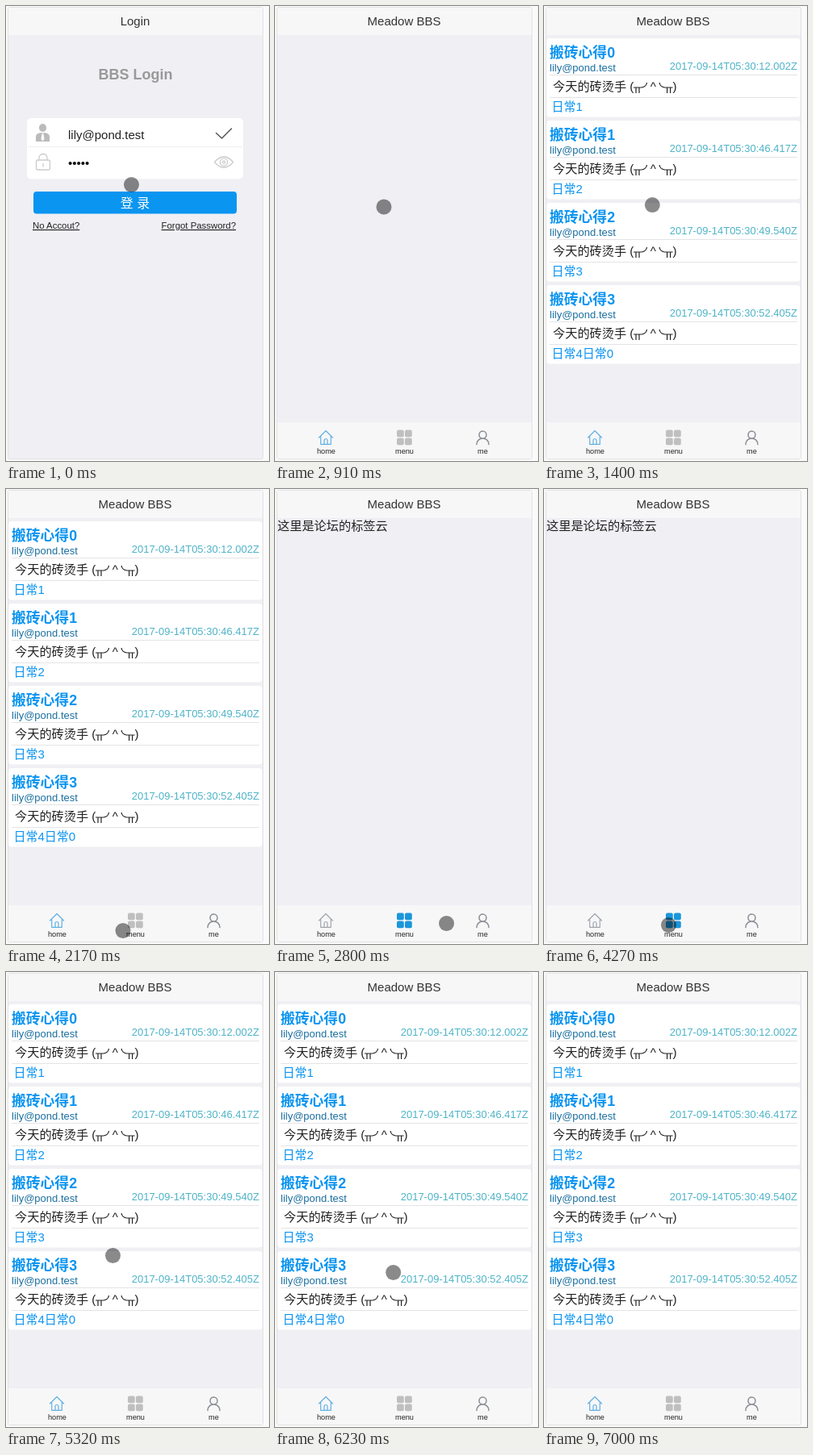
Write an HTML page that moves like this. It is 326 px wide and 564 px high and loops after 7490 ms.

```html
<!DOCTYPE html>
<html lang="zh">
<head>
<meta charset="utf-8">
<title>Forum app</title>
<style>
  html, body { margin: 0; width: 100%; height: 100%; overflow: hidden; background: #fafafa; }
  svg { display: block; width: 100vw; height: 100vh; }
  text { font-family: "Liberation Sans", Arial, "Noto Sans CJK SC", "Noto Sans CJK", sans-serif; white-space: pre; }
  .line { fill: none; stroke-linecap: round; stroke-linejoin: round; }
</style>
</head>
<body>
<svg id="stage" viewBox="0 0 326 564">
  <rect width="326" height="564" fill="#fafafa"/>
  <rect x="2.5" y="1.5" width="316" height="560" rx="2" fill="#efeff4" stroke="#e2e2e4"/>
  <rect x="3" y="2" width="315" height="34" fill="#f7f7f8"/>
  <text id="title" x="160" y="24" font-size="15" fill="#333" text-anchor="middle"></text>

  <g id="login">
    <text x="160.5" y="91" font-size="18" font-weight="bold" fill="#999" text-anchor="middle">BBS Login</text>
    <rect x="26" y="139" width="268" height="75.5" rx="5" fill="#fff"/>
    <path d="M27 174.5H293" stroke="#eee"/>
    <g fill="#bbb">
      <ellipse cx="45.5" cy="151" rx="4.6" ry="5"/>
      <path d="M37 168V162Q37 158.5 41 157.5L44 157L45.5 158L47 157L50 157.5Q54 158.5 54 162V168Z"/>
      <path d="M44.5 158.5H46.5L47.5 165L45.5 167.5L43.5 165Z" fill="#fff"/>
    </g>
    <g class="line" stroke="#ccc" stroke-width="1.3">
      <rect x="37.5" y="191" width="17" height="12" rx="2"/>
      <path d="M41 191V188A5 4.5 0 0 1 51 188V191M46 195.5V199"/>
      <path d="M258.5 193.5Q270 180 281.5 193.5Q270 207 258.5 193.5Z"/>
      <circle cx="270" cy="193.5" r="4.6"/>
      <circle cx="270" cy="193.5" r="1.6"/>
    </g>
    <path class="line" d="M260.5 157.5L267.5 164L279.5 152" stroke="#555" stroke-width="1.5"/>
    <text x="77" y="165" font-size="15" fill="#222">lily@pond.test</text>
    <text x="77" y="200" font-size="15" fill="#111">•••••</text>
    <rect x="34" y="230" width="252" height="27.5" rx="4" fill="#0a95f0"/>
    <text x="160" y="250" font-size="16" font-weight="500" fill="#fff" text-anchor="middle">登 录</text>
    <rect id="press" x="34" y="230" width="252" height="27.5" rx="4" opacity=".4"/>
    <g font-size="11.4" fill="#222" text-decoration="underline">
      <text x="33" y="276">No Accout?</text>
      <text x="285" y="276" text-anchor="end">Forgot Password?</text>
    </g>
  </g>

  <g id="cards"></g>
  <text id="note" x="3" y="51" font-size="15.2" fill="#222"></text>

  <g id="tabs">
    <rect x="3" y="516" width="315" height="45" fill="#f7f7f8"/>
    <path id="home" class="line" stroke-width="1.2" d="M54.5 535L63 526.5L71.5 535M56.7 533.5V543.3H69.3V533.5M61 543V538.5Q61 536.5 63 536.5T65 538.5V543"/>
    <g id="menu"></g>
    <path id="me" class="line" stroke-width="1.5" d="M253 531.5a4.5 4.5 0 1 1 9 0a4.5 4.5 0 1 1 -9 0M250 543.5C250 533.5 265 533.5 265 543.5"/>
    <g id="labels" font-size="9.2" fill="#222" text-anchor="middle"></g>
  </g>

  <circle id="touch" r="9.5" fill-opacity=".46"/>
</svg>
<script>
const LOOP = 7490, STEP = 70, PITCH = 102;
const $ = id => document.getElementById(id);
const show = (id, on) => $(id).setAttribute('display', on ? 'inline' : 'none');

const posts = [
  { sec: '12.002', tag: '日常1' },
  { sec: '46.417', tag: '日常2' },
  { sec: '49.540', tag: '日常3' },
  { sec: '52.405', tag: '日常4日常0' }
];

// One half of the crying face; the other half is its mirror image
const eye = 'M111 101H121Q127 100 127.500 95M114 101V108M118 101V108'.replace('.500', '.5');

const card = ({ sec, tag }, i) => `
  <g transform="translate(0 ${i * PITCH})">
    <rect x="3" y="40" width="314.5" height="97.5" rx="4" fill="#fff"/>
    <text x="7" y="63.5" font-size="17.8" font-weight="bold" fill="#0a94f0">搬砖心得${i}</text>
    <text x="7" y="81" font-size="13" fill="#1b6f9f">lily@pond.test</text>
    <text x="314" y="79" font-size="13" fill="#4fb3c8" text-anchor="end">2017-09-14T05:30:${sec}Z</text>
    <path d="M7 85.5H314M7 113.5H314" stroke="#e4e4e6"/>
    <g font-size="15.2" fill="#222">
      <text x="11" y="105">今天的砖烫手 (</text>
      <text x="135.3" y="105" text-anchor="middle">^</text>
      <text x="159.5" y="105">)</text>
    </g>
    <g fill="none" stroke="#222" stroke-width="1.2">
      <path d="${eye}"/>
      <path d="${eye}" transform="translate(270.6 0) scale(-1 1)"/>
    </g>
    <text x="9.5" y="130" font-size="15" fill="#0a94f0">${tag}</text>
  </g>`;

$('cards').innerHTML = posts.map(card).join('');
$('menu').innerHTML = [0, 1, 2, 3].map(i =>
  `<rect x="${151 + i % 2 * 10}" y="${525.5 + (i >> 1) * 10}" width="8.8" height="8.8" rx="2"/>`).join('');
$('labels').innerHTML = ['home', 'menu', 'me'].map((name, i) =>
  `<text x="${63.5 + i * 97}" y="555">${name}</text>`).join('');

const pages = [
  { at: 0, name: 'login' },
  { at: 910, name: 'home' },
  { at: 2590, name: 'menu' },
  { at: 3570, name: 'me' },
  { at: 4200, name: 'menu' },
  { at: 4830, name: 'home' }
];
const notes = { menu: '这里是论坛的标签云', me: '这里是个人中心' };

// Each move eases on from where the last one ended
const moves = [
  { from: 0, to: 210, x: 135, y: 249 },
  { from: 1330, to: 1750, x: 98, y: 120 },
  { from: 1750, to: 2170, x: 145, y: 547.5 },
  { from: 2170, to: 2450, x: 165, y: 540 },
  { from: 2730, to: 3360, x: 257, y: 537, overshoot: true },
  { from: 3500, to: 3990, x: 154.5, y: 540.5 },
  { from: 4270, to: 4690, x: 54, y: 545 },
  { from: 5040, to: 5320, x: 132.5, y: 351.5 },
  { from: 5320, to: 5670, x: 144, y: 359 },
  { from: 6160, to: 6440, x: 187, y: 576 },
  { from: 6510, to: 7000, x: 261, y: 576, hop: 18 }
];

const easeInOut = k => k < 0.5 ? 4 * k ** 3 : 1 - 4 * (1 - k) ** 3;
const easeBack = k => 1 + 3.5 * (k - 1) ** 3 + 2.5 * (k - 1) ** 2;

function touchAt(t) {
  let x = 155.5, y = 221.5;
  for (const m of moves) {
    if (t <= m.from) break;
    const k = Math.min(1, (t - m.from) / (m.to - m.from));
    const e = m.overshoot ? easeBack(k) : easeInOut(k);
    x += (m.x - x) * e;
    y += (m.y - y) * e - (m.hop || 0) * Math.sin(Math.PI * k);
  }
  return [x, y];
}

function draw(ms) {
  const t = Math.floor((ms % LOOP) / STEP) * STEP;
  const page = pages.filter(p => p.at <= t).pop();
  const is = name => page.name === name;

  $('title').textContent = is('login') ? 'Login' : 'Meadow BBS';
  show('login', is('login'));
  show('press', t === 420);
  show('tabs', !is('login'));
  show('cards', is('home') && t > page.at);
  $('note').textContent = notes[page.name] || '';

  $('home').setAttribute('stroke', is('home') ? '#62b0e2' : '#a0a6ae');
  $('menu').setAttribute('fill', is('menu') ? '#1a96db' : '#bfbfbf');
  $('me').setAttribute('stroke', is('me') ? '#1a96db' : '#8b8f94');

  const [x, y] = touchAt(t);
  $('touch').setAttribute('cx', x);
  $('touch').setAttribute('cy', y);
}

const start = performance.now();
function tick() {
  draw(performance.now() - start);
  requestAnimationFrame(tick);
}
tick();
</script>
</body>
</html>
```
